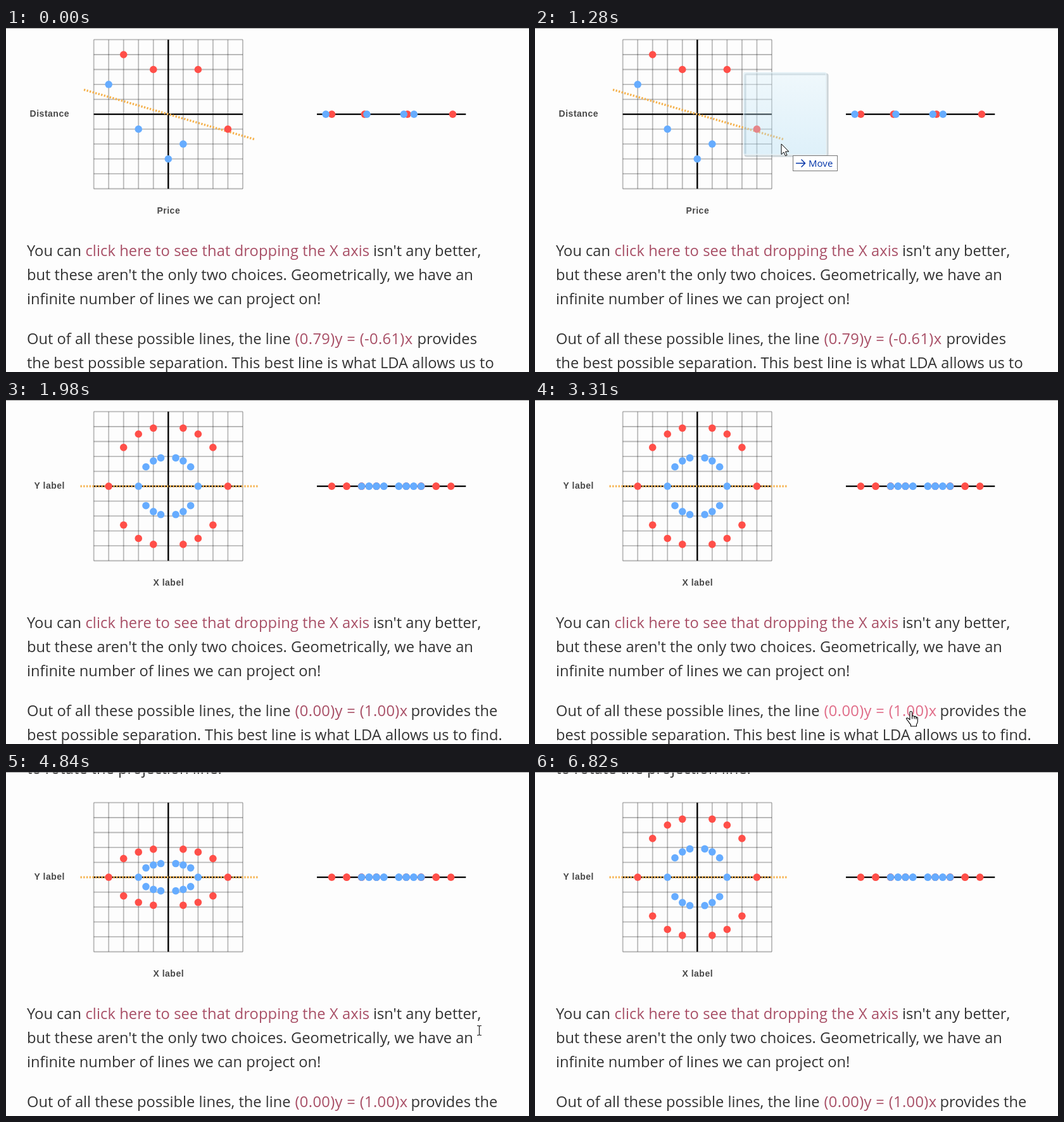
Animation of 826 by 543 pixels, one loop 7090 ms. Source, as an HTML page:

```html
<!DOCTYPE html>
<html lang="en">
<head>
<meta charset="utf-8">
<title>Projection line</title>
<style>
  html, body { margin: 0; width: 100%; height: 100%; overflow: hidden; background: #fdfdfd; }
  svg { display: block; width: 826px; height: 543px; }
  .prose { font: 23.68px "Open Sans", "Noto Sans", sans-serif; fill: #333; white-space: pre; }
  .link { fill: #a84f66; letter-spacing: .1px; }
  .link.hover { fill: #e06c88; }
  .link.eq { letter-spacing: .35px; }
  .label { font: bold 14px "Liberation Sans", Arial, sans-serif; letter-spacing: .5px; fill: #484848; text-anchor: middle; }
  .grid { stroke: #000; stroke-opacity: .27; stroke-width: 1.8; }
  .axis { stroke: #000; stroke-width: 2.4; }
  .red { fill: #ff4f49; }
  .blue { fill: #66acff; }
  .move { font: 15px "Open Sans", "Noto Sans", sans-serif; fill: #0033a8; }
</style>
</head>
<body>
<svg viewBox="0 0 826 543">
  <defs>
    <linearGradient id="glass" x1="0" y1="0" x2="0" y2="1">
      <stop offset="0" stop-color="#dcf1fa" stop-opacity=".4"/>
      <stop offset="1" stop-color="#a8daf3" stop-opacity=".36"/>
    </linearGradient>
    <path id="arrowCursor" d="M0 0V16.5L3.9 12.9 6.5 18.7 9 17.6 6.5 12H11.8Z"
          fill="#fff" stroke="#000" stroke-width="1"/>
  </defs>

  <g id="page">
    <g id="grid"></g>
    <line id="line" x1="141.2" x2="-141.2" stroke="#f5b14c" stroke-width="3.4" stroke-dasharray="2.353"/>
    <line class="axis" x1="491" x2="726.3" y1="136.1" y2="136.1"/>
    <g id="dots"></g>
    <text class="label" id="yLabel" x="68.8" y="140"></text>
    <text class="label" id="xLabel" x="256.8" y="293"></text>
    <g class="prose">
      <text x="33" y="-27.5">to rotate the projection line.</text>
      <text y="360"><tspan x="33">You can</tspan><tspan class="link" x="125.5">click here to see that dropping the X axis</tspan><tspan x="580">isn't any better,</tspan></text>
      <text x="33" y="398">but these aren't the only two choices. Geometrically, we have an</text>
      <text x="33" y="436">infinite number of lines we can project on!</text>
      <text y="499"><tspan x="33">Out of all these possible lines, the line</tspan><tspan class="link eq" id="eq" x="456.5"></tspan><tspan id="tail"></tspan></text>
      <text x="33" y="537" id="last"></text>
    </g>
  </g>

  <path d="M0 .5H826" stroke="#a0a0a0"/>

  <g id="drag">
    <rect x="-57" y="-110" width="130" height="129" rx="2" fill="none" stroke="#5b7480" stroke-opacity=".3" stroke-width="3"/>
    <rect x="-59.5" y="-112.5" width="130" height="129" rx="2" fill="url(#glass)" stroke="#e4f1f7" stroke-width="1.4"/>
    <use href="#arrowCursor"/>
    <rect x="18.5" y="18.5" width="70" height="24" fill="#fff" stroke="#777"/>
    <path d="M23 30.5H37M31.5 24.5L37.5 30.5 31.5 36.5" fill="none" stroke="#0033a8" stroke-width="1.4"/>
    <text class="move" x="43" y="36">Move</text>
  </g>
  <g id="beam" fill="none">
    <path d="M-3.5 -7.5H-1L0 -6.5 1 -7.5H3.5M0 -6.5V6.5M-3.5 7.5H-1L0 6.5 1 7.5H3.5" stroke="#222" stroke-width="1.2"/>
  </g>
  <g id="hand" fill="#fff" stroke="#000" stroke-width="1.1" stroke-linejoin="round">
    <path d="M-2 1.5Q-2 0 -.3 0T1.6 1.5V8Q2 6.8 3.4 7T5 8.6Q5.4 7.6 6.6 7.9T8 9.6Q8.6 8.8 9.6 9.3T10.3 11V16Q10.2 18.5 8.5 20.5V23.5H-.5V21Q-2.5 19 -4.3 15.8 -6.5 13.2 -7.4 11.8 -7.6 10.2 -6 10.2 -4.4 10.6 -2 13.2Z"/>
    <path d="M1.6 8V12M5 8.6V12M8 9.6V12.4" fill="none"/>
  </g>
</svg>

<script>
const LOOP = 7090, UNIT = 23.53, CX = 256.3, CY = 136.1, FLAT_X = 608.6;
const TILT = 16.2 * Math.PI / 180;
const $ = id => document.getElementById(id);

function add(parent, tag, attrs) {
  const node = document.createElementNS("http://www.w3.org/2000/svg", tag);
  for (const name in attrs) node.setAttribute(name, attrs[name]);
  return parent.appendChild(node);
}

// Mirrors one quadrant of a ring around both axes.
function ring(radius, quadrant) {
  const points = [[-radius, 0], [radius, 0]];
  for (const [x, y] of quadrant)
    for (const sx of [-1, 1]) for (const sy of [-1, 1]) points.push([sx * x, sy * y]);
  return points;
}

const before = {
  red: [[-3, 4], [-1, 3], [2, 3], [4, -1]],
  blue: [[-4, 2], [-2, -1], [0, -3], [1, -2]],
  x: "Price", y: "Distance", eq: "(0.79)y = (-0.61)x", tail: "provides", tailX: 649.5,
  last: "the best possible separation. This best line is what LDA allows us to"
};
const after = {
  red: ring(4, [[3, 2.6], [2, 3.5], [1, 3.9]]),
  blue: ring(2, [[1.5, 1.3], [1, 1.7], [.5, 1.9]]),
  x: "X label", y: "Y label", eq: "(0.00)y = (1.00)x", tail: "provides the", tailX: 639.5,
  last: "best possible separation. This best line is what LDA allows us to find."
};

for (let i = -5; i <= 5; i++) {
  const d = i * UNIT, half = 5 * UNIT;
  const style = i ? "grid" : "axis";
  add($("grid"), "line", { class: style, x1: CX + d, x2: CX + d, y1: CY - half, y2: CY + half });
  add($("grid"), "line", { class: style, x1: CX - half, x2: CX + half, y1: CY + d, y2: CY + d });
}

function buildDots(set) {
  set.group = add($("dots"), "g", {});
  set.dots = [];
  for (const color of ["red", "blue"])
    for (const [x, y] of set[color]) {
      const dot = () => add(set.group, "circle", { class: color, r: 5.8, cy: CY });
      set.dots.push({ x, y, plot: dot(), flat: dot() });
    }
}
[before, after].forEach(buildDots);

const show = (node, on) => node.style.display = on ? "" : "none";
const place = (node, x, y) => node.setAttribute("transform", `translate(${x} ${y})`);
const lerp = (a, b, p) => a + (b - a) * p;
const smooth = p => (1 - Math.cos(Math.PI * p)) / 2;

// Progress from 0 to 1, advancing once every `step` ms.
function progress(t, start, duration, step) {
  const passed = Math.floor((t - start) / step) * step;
  return Math.min(1, Math.max(0, passed / duration));
}

let current;
function useSet(set) {
  if (set === current) return;
  current = set;
  for (const s of [before, after]) show(s.group, s === set);
  $("xLabel").textContent = set.x;
  $("yLabel").textContent = set.y;
  $("eq").textContent = set.eq;
  $("tail").textContent = set.tail;
  $("tail").setAttribute("x", set.tailX);
  $("last").textContent = set.last;
}

function drawPlot(t) {
  useSet(t < 1800 ? before : after);
  const angle = TILT * (1 - progress(t, 1740, 240, 60));
  const height = 1 - smooth(progress(t, 4464, 712, 52)) + smooth(progress(t, 6132, 676, 52));
  const cos = Math.cos(angle), sin = Math.sin(angle);
  $("line").setAttribute("transform", `translate(${CX} ${CY}) rotate(${angle * 180 / Math.PI})`);
  for (const { x, y, plot, flat } of current.dots) {
    plot.setAttribute("cx", CX + x * UNIT);
    plot.setAttribute("cy", CY - y * height * UNIT);
    flat.setAttribute("cx", FLAT_X + (x * cos - y * height * sin) * UNIT);
  }
  place($("page"), 0, t < 3540 ? 0 : t < 3620 ? 10 : t < 3700 ? 20 : 30);
}

function drawPointer(t) {
  const left = 1 - progress(t, 894, 530, 53);
  show($("drag"), t >= 910 && t < 1650);
  place($("drag"), 379 + 311 * left ** 2.85, 176 + 316 * left ** 3.16);

  const toLink = smooth(progress(t, 2910, 400, 50));
  const away = smooth(progress(t, 3764, 304, 76));
  const leave = progress(t, 5698, 260, 52);
  const onLink = toLink > .9 && t < 3700;
  show($("hand"), onLink);
  show($("beam"), t >= 2820 && t < 5960 && !onLink);
  place($("hand"), 594, 491.5);
  let x = lerp(687.5, 594, toLink) + 25 * Math.sin(Math.PI * toLink);
  let y = lerp(368, 492, toLink);
  x = lerp(x, 747.5, away) - 60 * leave;
  y = lerp(y, 408, away);
  place($("beam"), x, y);
  $("eq").classList.toggle("hover", onLink);
}

const origin = performance.now();
function frame() {
  const t = Math.max(0, performance.now() - origin) % LOOP;
  drawPlot(t);
  drawPointer(t);
  requestAnimationFrame(frame);
}
frame();
</script>
</body>
</html>
```
